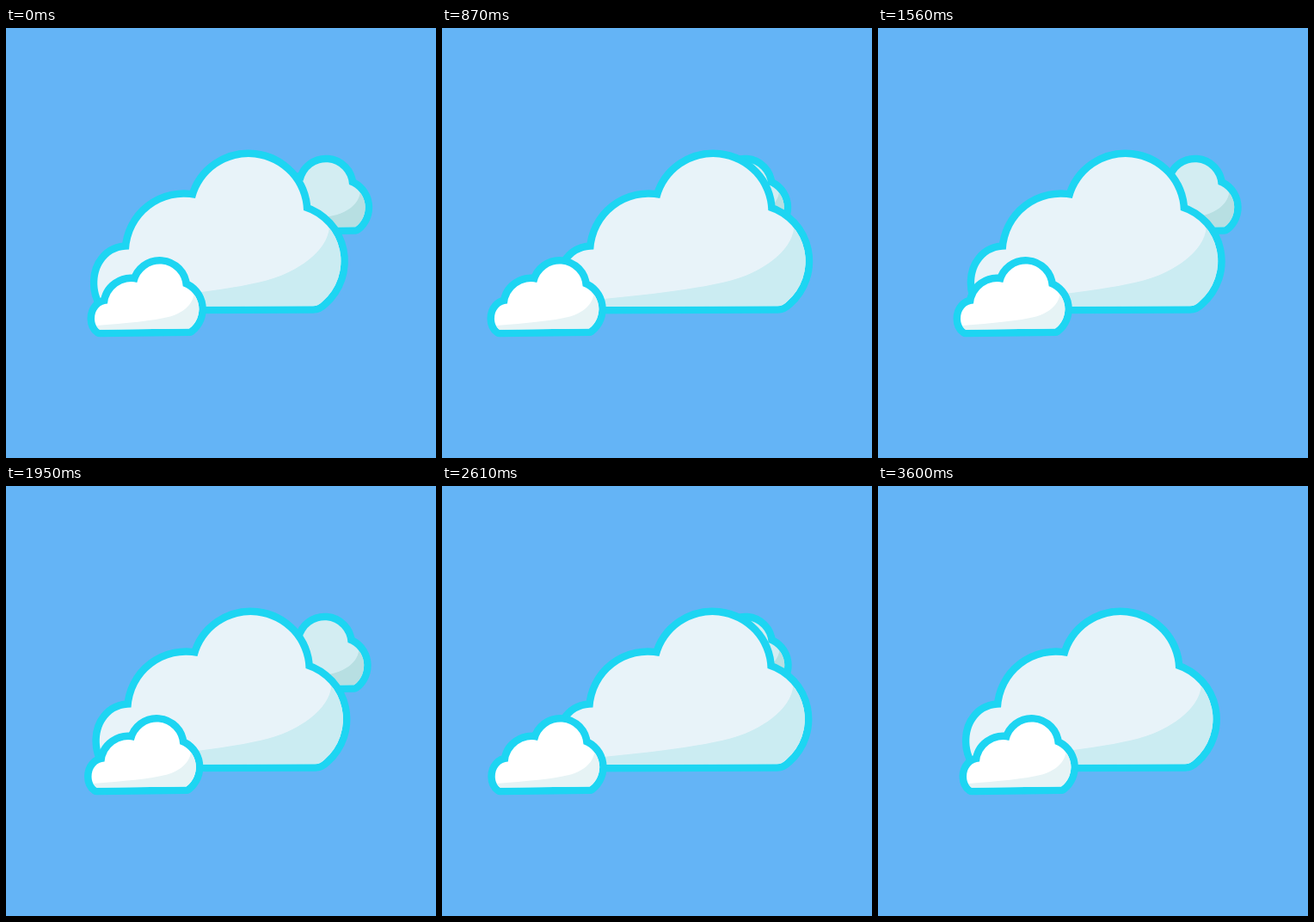
An HTML page that plays this animation: 500 by 500 pixels, repeating every 3.63 s.

```html
<!DOCTYPE html>
<html lang="en">
<head>
<meta charset="utf-8">
<title>Drifting clouds</title>
<style>
  html, body { margin: 0; width: 100%; height: 100%; overflow: hidden; background: #64b4f6; }
  svg { display: block; width: 100vw; height: 100vh; }
  .edge { stroke: #1dd5f2; stroke-width: 17; stroke-linejoin: round; paint-order: stroke; }
</style>
</head>
<body>
<svg viewBox="0 0 500 500">
  <defs>
    <path id="puff" d="M109 350.8C105 348 103 343 103 338C103 328 109 321 118 320.5A27.5 27.5 0 0 1 152.3 296
      A27 27 0 0 1 205.7 300.3A28.3 28.3 0 0 1 213 349.6Z"/>
    <path id="puffShade" d="M218.5 310C216 324 203 332 191 335.5C170 341 140 343 100 346.5V360H240V310Z"/>
    <path id="bank" d="M115 324C102 305 105 282 115 270C122 261 132 257.5 143 257.5A64 64 0 0 1 220 198
      A64 63.7 0 0 1 346 212A62 62 0 0 1 368 318Q363 323.3 357 323.3Z"/>
    <path id="bankShade" d="M376 231C374 262 334 284 311 291C270 304 190 312 110 319V335H400V231Z"/>
    <clipPath id="inPuff"><use href="#puff"/></clipPath>
    <clipPath id="inBank"><use href="#bank"/></clipPath>
  </defs>
  <g id="back">
    <g transform="translate(193.3 -118.3)">
      <use href="#puff" class="edge" fill="#d3edf2"/>
      <use href="#puffShade" clip-path="url(#inPuff)" fill="#b7dfe2"/>
    </g>
  </g>
  <g id="middle">
    <use href="#bank" class="edge" fill="#e8f3f9"/>
    <use href="#bankShade" clip-path="url(#inBank)" fill="#cbecf2"/>
  </g>
  <g id="front">
    <use href="#puff" class="edge" fill="#fff"/>
    <use href="#puffShade" clip-path="url(#inPuff)" fill="#e6f3f5"/>
  </g>
</svg>
<script>
  const LOOP = 3630, BACK_END = 3600;
  // Each cloud swings out and back twice; keys are the turning times in ms.
  const clouds = [
    { id: 'back', reach: -20, keys: [0, 900, 1800, 2700, 3600] },
    { id: 'middle', reach: 33.4, keys: [0, 900, 1800, 2700, 3615] },
    { id: 'front', reach: -42.2, keys: [0, 900, 1792, 2692, 3575] }
  ].map(c => ({ ...c, node: document.getElementById(c.id) }));

  const ease = u => u * u * (3 - 2 * u);

  function swing(keys, t) {
    const i = keys.findIndex((k, n) => t >= k && t < keys[n + 1]);
    if (i < 0) return 0;
    const u = ease((t - keys[i]) / (keys[i + 1] - keys[i]));
    return i % 2 ? 1 - u : u;
  }

  function draw(now) {
    const t = now % LOOP;
    for (const { node, reach, keys } of clouds)
      node.setAttribute('transform', `translate(${reach * swing(keys, t)} 0)`);
    clouds[0].node.style.display = t < BACK_END ? '' : 'none';
  }

  const start = performance.now();
  function tick() {
    draw(performance.now() - start);
    requestAnimationFrame(tick);
  }
  tick();
</script>
</body>
</html>
```
